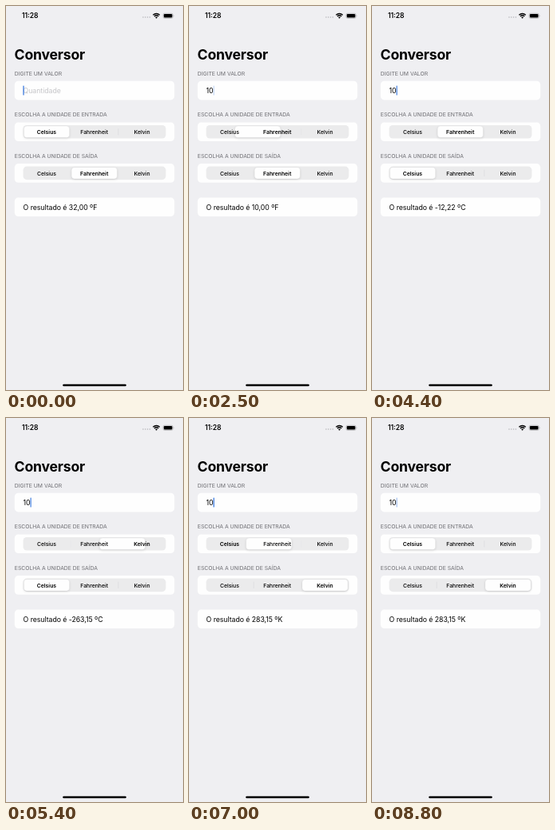
These frames come from a looping animation (222 by 480 pixels, 8.9 s). An HTML page:

```html
<!DOCTYPE html>
<html lang="pt">
<head>
<meta charset="utf-8">
<title>Conversor</title>
<style>
html, body { margin: 0; width: 100%; height: 100%; overflow: hidden; background: #efeff2; }
svg { display: block; width: 222px; height: 480px; font-family: Inter, Roboto, sans-serif; }
.head { font-size: 6.8px; fill: #6d6d72; }
.body { font-size: 8.75px; letter-spacing: -0.05px; }
.seg { font-size: 6.85px; font-weight: 500; text-anchor: middle; }
.thumb { fill: #fefefe; stroke: rgba(0,0,0,.07); stroke-width: .5; filter: drop-shadow(0 1px 1.6px rgba(0,0,0,.12)); }
</style>
</head>
<body>
<svg id="stage" viewBox="0 0 222 480">
  <rect width="222" height="480" fill="#efeff2"/>
  <text x="19.9" y="15.4" font-size="8.5" font-weight="600">11:28</text>
  <g fill="#b4b4b8">
    <circle cx="172" cy="14" r=".8"/><circle cx="174.8" cy="14" r=".8"/>
    <circle cx="177.6" cy="14" r=".8"/><circle cx="180.4" cy="14" r=".8"/>
  </g>
  <g fill="none" stroke="#000" stroke-width="1.4">
    <path d="M184.4 11.3Q188.6 7.7 192.8 11.3"/>
    <path d="M185.9 13Q188.6 10.7 191.3 13"/>
  </g>
  <path d="M187.1 14.1Q188.6 12.9 190.1 14.1L188.6 15.7Z"/>
  <rect x="197" y="9.2" width="12.4" height="6.2" rx="1.9" fill="none" stroke="#a4a4a8" stroke-width=".6"/>
  <rect x="197.9" y="10.1" width="10.6" height="4.4" rx="1.1"/>
  <path d="M210.2 11.3Q211.4 12.3 210.2 13.3Z" fill="#a4a4a8"/>

  <text x="10.6" y="66.5" font-size="17.6" font-weight="700" letter-spacing="-.2">Conversor</text>
  <g class="head">
    <text x="10.8" y="86.8">DIGITE UM VALOR</text>
    <text x="10.8" y="138.2">ESCOLHA A UNIDADE DE ENTRADA</text>
    <text x="10.8" y="189.8">ESCOLHA A UNIDADE DE SAÍDA</text>
  </g>
  <g fill="#fefefe">
    <rect x="10.8" y="93.8" width="200.4" height="23.6" rx="4.5"/>
    <rect x="10.8" y="145.5" width="200.4" height="23.6" rx="4.5"/>
    <rect x="10.8" y="197.1" width="200.4" height="23.6" rx="4.5"/>
    <rect x="10.8" y="239.4" width="200.4" height="23.6" rx="4.5"/>
  </g>
  <text id="entry" class="body" x="21.6" y="109"></text>
  <rect id="caret" y="99.5" width="1.2" height="12" rx=".6" fill="#2a6fdc"/>
  <text id="result" class="body" x="21.6" y="254.7"></text>
  <rect x="71.2" y="472.8" width="79.6" height="2.5" rx="1.25"/>
</svg>
<script>
const LOOP = 8900, STEP = 100, PITCH = 59.8;
const UNITS = ['Celsius', 'Fahrenheit', 'Kelvin'];
const stage = document.getElementById('stage');
const entry = document.getElementById('entry');
const caret = document.getElementById('caret');
const result = document.getElementById('result');

// [time, unit index]
const INPUT_TAPS = [[-1000, 0], [2410, 1], [5310, 2], [6910, 0]];
const OUTPUT_TAPS = [[-1000, 1], [3410, 0], [6210, 2]];
// [caret fully hidden, caret fully back]
const BLINKS = [[145, 477], [1545, 1877], [2540, 2877], [3540, 3877], [4526, 4877],
  [5526, 5877], [6545, 6877], [7545, 7877], [8545, 8877]];
const FADE = 140;

const clamp = v => Math.max(0, Math.min(1, v));
const mix = (a, b, p) => a + (b - a) * p;
// Critically damped spring
const spring = ms => 1 - (1 + ms * 0.022) * Math.exp(-ms * 0.022);

function add(tag, attrs, text = '') {
  const el = document.createElementNS('http://www.w3.org/2000/svg', tag);
  for (const k in attrs) el.setAttribute(k, attrs[k]);
  el.textContent = text;
  stage.appendChild(el);
  return el;
}

function makePicker(y, taps) {
  add('rect', { x: 21.5, y, width: 179, height: 16.6, rx: 4.6, fill: '#ebebec' });
  const bars = [1, 2].map(i =>
    add('rect', { x: 21 + PITCH * i, y: y + 4.2, width: .6, height: 8.2, fill: '#d8d8db' }));
  const thumb = add('rect', { class: 'thumb', y: y + 1.1, width: 57.2, height: 14.4, rx: 3.8 });
  const names = UNITS.map((name, i) =>
    add('text', { class: 'seg', x: 50.9 + PITCH * i, y: y + 10.9 }, name));

  return t => {
    const n = taps.findLastIndex(tap => tap[0] <= t);
    const [start, to] = taps[n];
    const from = taps[Math.max(0, n - 1)][1];
    const p = spring(t - start);
    thumb.setAttribute('x', 22.4 + PITCH * mix(from, to, p));
    bars.forEach((bar, i) => {
      const shown = unit => +(unit !== i && unit !== i + 1);
      const q = shown(to) ? p ** 3 : p;
      bar.setAttribute('opacity', mix(shown(from), shown(to), q));
    });
    names.forEach((el, i) => { el.style.fontWeight = i === to ? 600 : 500; });
    return to;
  };
}

const inputPicker = makePicker(149, INPUT_TAPS);
const outputPicker = makePicker(200.6, OUTPUT_TAPS);

function convert(v, from, to) {
  const c = [v, (v - 32) / 1.8, v - 273.15][from];
  return [c, c * 1.8 + 32, c + 273.15][to];
}

function caretOpacity(t) {
  for (const [gone, back] of BLINKS) {
    if (t > gone - FADE && t < back)
      return Math.max(clamp((gone - t) / FADE), clamp(1 - (back - t) / FADE));
  }
  return 1;
}

function draw(t) {
  const typed = t < 600 ? '' : t < 900 ? '1' : '10';
  entry.textContent = typed || 'Quantidade';
  entry.setAttribute('fill', typed ? '#000' : '#c5c5c8');
  caret.setAttribute('x', [21.4, 25.4, 30.5][typed.length]);
  caret.setAttribute('opacity', caretOpacity(t));

  const from = inputPicker(t), to = outputPicker(t);
  const value = convert(Number(typed), from, to).toFixed(2).replace('.', ',');
  result.textContent = `O resultado é ${value} º${UNITS[to][0]}`;
}

function tick() {
  const t = performance.now() % LOOP;
  draw(Math.floor(t / STEP) * STEP);
  requestAnimationFrame(tick);
}
draw(0);
requestAnimationFrame(tick);
</script>
</body>
</html>
```
